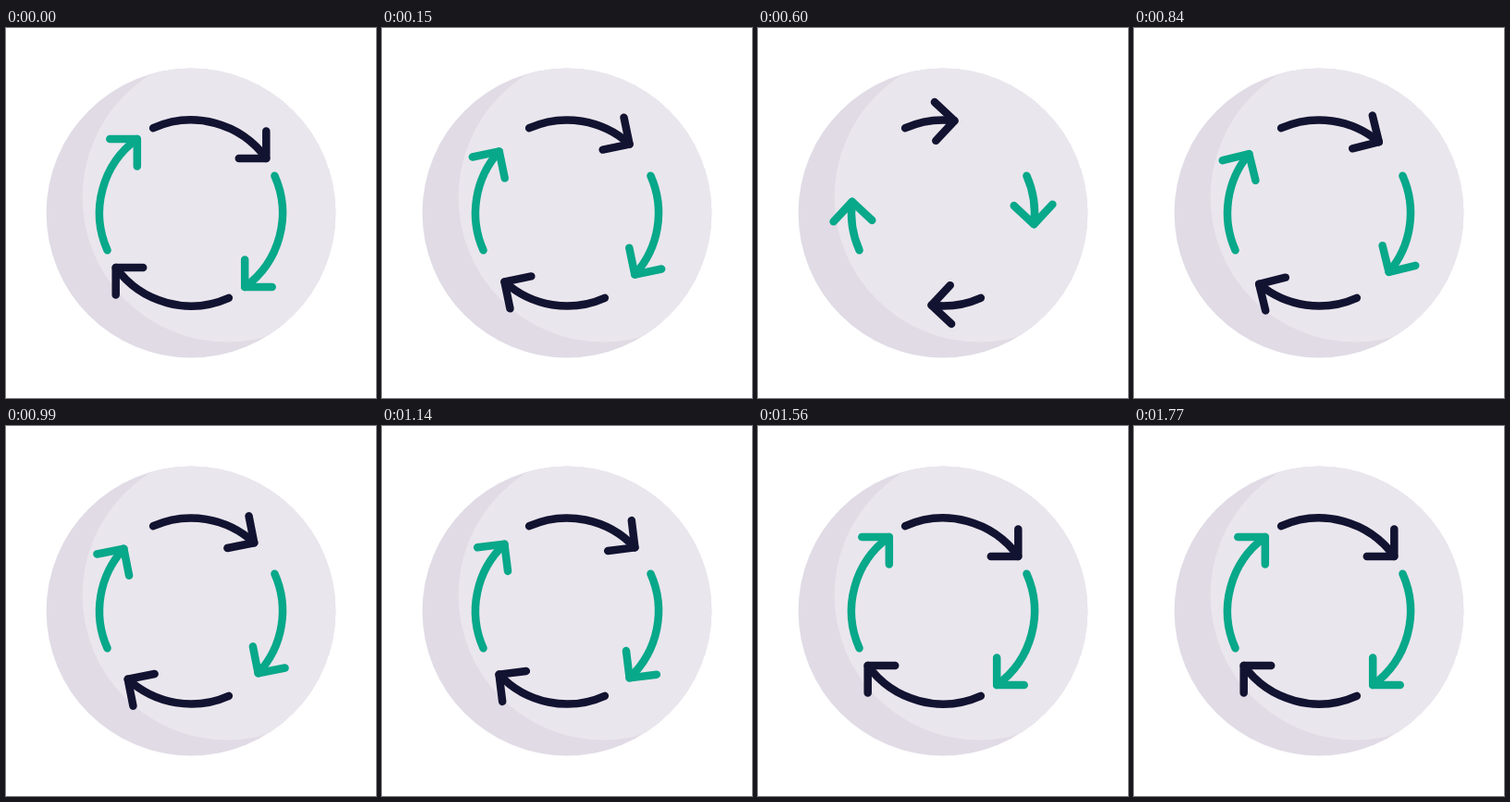
Write an HTML page with a canvas that moves like this. It is 400 px wide and 400 px high and loops after 1.83 s.

```html
<!DOCTYPE html>
<html lang="en">
<head>
<meta charset="utf-8">
<title>Cycle arrows</title>
<style>
  html, body { margin: 0; width: 100%; height: 100%; overflow: hidden; background: #fff; }
  canvas { display: block; width: 400px; height: 400px; }
</style>
</head>
<body>
<canvas id="stage"></canvas>
<script>
const LOOP = 1830, STEP = 30;
const DARK = '#121331', GREEN = '#08a88a';
const LIGHT = '#eae6ed', SHADE = '#e0dbe5';
const TAIL = -24, REST = 54, ARM = 29.5;

// Arrow tip angle in degrees, clockwise from the arrow's own axis: [ms, angle]
const KEYS = [[0, REST], [515, -3.4], [780, 39.9], [1500, REST]];

const canvas = document.getElementById('stage');
const ctx = canvas.getContext('2d');
const scale = window.devicePixelRatio || 1;
canvas.width = canvas.height = 400 * scale;

const rad = deg => deg * Math.PI / 180;
const ease = p => p * p * (3 - 2 * p);

function tipAngle(t) {
  for (let i = 1; i < KEYS.length; i++) {
    const [t0, a] = KEYS[i - 1], [t1, b] = KEYS[i];
    if (t < t1) return a + (b - a) * ease((t - t0) / (t1 - t0));
  }
  return REST;
}

function disc(x, y, r, color) {
  ctx.fillStyle = color;
  ctx.beginPath();
  ctx.arc(x, y, r, 0, 2 * Math.PI);
  ctx.fill();
}

function background() {
  ctx.fillStyle = '#fff';
  ctx.fillRect(0, 0, 400, 400);
  disc(200, 200, 156.4, SHADE);
  ctx.save();
  ctx.beginPath();
  ctx.arc(200, 200, 156.4, 0, 2 * Math.PI);
  ctx.clip();
  disc(239, 183, 156.4, LIGHT);
  ctx.restore();
}

function arrow(quarter, angle) {
  const even = quarter % 2 === 0;
  const r = even ? 100.5 : 99;
  ctx.strokeStyle = even ? DARK : GREEN;
  ctx.save();
  ctx.translate(200, 200);
  ctx.rotate(quarter * Math.PI / 2);

  ctx.beginPath();
  ctx.arc(0, 0, r, rad(TAIL - 90), rad(angle - 90));
  ctx.stroke();

  // The head turns rigidly about the centre; at rest its arms are square to the stage
  ctx.rotate(rad(angle - REST));
  const x = r * Math.sin(rad(REST)), y = -r * Math.cos(rad(REST));
  ctx.beginPath();
  ctx.moveTo(x, y - ARM);
  ctx.lineTo(x, y);
  ctx.lineTo(x - ARM, y);
  ctx.stroke();
  ctx.restore();
}

function draw(t) {
  ctx.setTransform(scale, 0, 0, scale, 0, 0);
  ctx.lineWidth = 8.5;
  ctx.lineCap = ctx.lineJoin = 'round';
  background();
  const angle = tipAngle(t);
  for (let q = 0; q < 4; q++) arrow(q, angle);
}

const start = performance.now();
function tick() {
  const t = (performance.now() - start) % LOOP;
  draw(Math.floor(t / STEP) * STEP);
  requestAnimationFrame(tick);
}
tick();
</script>
</body>
</html>
```
